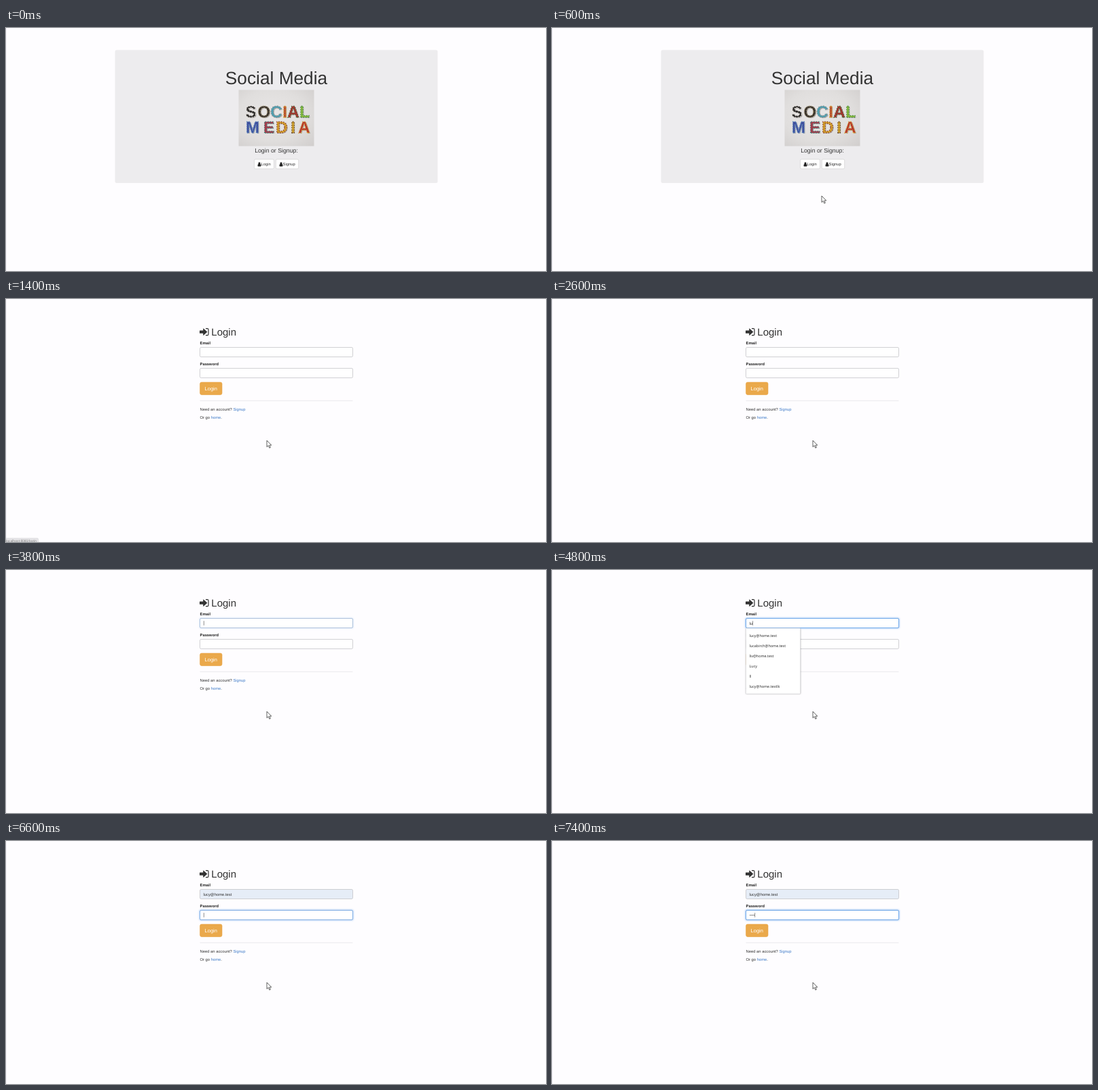
Animation of 795 by 359 pixels, one loop 8000 ms. Source, as an HTML page:

```html
<!DOCTYPE html>
<html lang="en">
<head>
<meta charset="utf-8">
<title>Login</title>
<style>
  html, body { margin: 0; width: 100%; height: 100%; overflow: hidden; background: #fefdff; }
  svg { display: block; width: 795px; height: 359px; }
  text { font-family: "Liberation Sans", Arial, sans-serif; font-size: 5.83px; fill: #333; text-rendering: geometricPrecision; white-space: pre; }
  .mid { text-anchor: middle; }
  .label { font-weight: bold; fill: #222; }
  .link { fill: #3f7bc8; }
  .ui { font-family: "Open Sans", "Noto Sans", sans-serif; font-size: 5.45px; fill: #222; }
  .field { fill: #fff; stroke: #c4c4c8; stroke-width: .8; }
  .glow { fill: none; stroke: #66a5ee; }
  .btn { fill: #fff; stroke: #ccc; stroke-width: .6; }
  .btn.down { fill: #e6e6e6; stroke: #999; stroke-width: 1; }
  .letter { font-weight: bold; font-size: 24px; text-anchor: middle; }
  .caret { fill: #444; }
</style>
</head>
<body>
<svg viewBox="0 0 795 359">
  <defs>
    <radialGradient id="wall" cx=".45" cy=".45" r=".75">
      <stop offset="0" stop-color="#e9e7e7"/>
      <stop offset=".6" stop-color="#e0dedd"/>
      <stop offset="1" stop-color="#d2cfce"/>
    </radialGradient>
    <filter id="soft" x="-20%" y="-20%" width="140%" height="140%"><feGaussianBlur stdDeviation="1"/></filter>
    <path id="user" d="M-2.5 3q-.2-3 1.2-3.1q1.3.9 2.6 0q1.4.1 1.2 3.1q-.2.4-.6.4h-3.8q-.4 0-.6-.4zM0-2.7a1.6 1.6 0 0 1 0 3.2a1.6 1.6 0 0 1 0-3.2z" fill="#222"/>
  </defs>
  <rect width="795" height="359" fill="#fefdff"/>
  <rect width="1" height="359" fill="#f5f3fb"/>

  <g id="home">
    <rect x="160.5" y="32.5" width="475" height="196.5" rx="2.5" fill="#edecee"/>
    <text class="mid" x="398" y="82.5" style="font-size:26.25px">Social Media</text>
    <rect x="342.5" y="91.5" width="111" height="83" fill="url(#wall)"/>
    <g id="letters"></g>
    <text class="mid" x="398" y="183.5" style="font-size:8.75px">Login or Signup:</text>
    <rect id="loginBtn" class="btn" x="365.5" y="194" width="29" height="14" rx="1.7"/>
    <rect class="btn" x="397.3" y="194" width="33.4" height="14" rx="1.7"/>
    <use href="#user" x="373" y="201"/>
    <use href="#user" x="405" y="201"/>
    <text x="375.5" y="203.2">Login</text>
    <text x="407.5" y="203.2">Signup</text>
  </g>

  <g id="form">
    <path d="M285.6 46.4h4.6v-2.4q0-.8.8-.3l5 4.5q.4.4 0 .8l-5 4.5q-.8.5-.8-.3v-2.4h-4.6q-.6 0-.6-.6v-3.2q0-.6.6-.6z" fill="#333"/>
    <path d="M294 43.6h2.4q1.6 0 1.6 1.6v6.8q0 1.6-1.6 1.6h-2.4" fill="none" stroke="#333" stroke-width="1.2"/>
    <text x="302.3" y="54" style="font-size:15px">Login</text>
    <text class="label" x="285.5" y="67.3">Email</text>
    <text class="label" x="285.5" y="98.2">Password</text>
    <g id="email"></g>
    <g id="password"></g>
    <rect x="285.6" y="123" width="32.4" height="18.4" rx="2.3" fill="#eaa94b" stroke="#e8a03c" stroke-width=".6"/>
    <text class="mid" x="301.8" y="134.6" style="font-size:7.5px;fill:#fff">Login</text>
    <path d="M285.5 150.3h225" stroke="#e6e5e9" stroke-width=".8"/>
    <text x="285.5" y="164.8">Need an account? <tspan class="link">Signup</tspan></text>
    <text x="285.5" y="177.3">Or go <tspan class="link">home</tspan>.</text>
    <g id="menu">
      <rect id="menuShade" x="285.5" y="87" width="80.5" fill="#000" opacity=".28" filter="url(#soft)"/>
      <rect id="menuBox" x="285.4" y="86" width="80.2" rx=".8" fill="#fff" stroke="#d2d2d6" stroke-width=".6"/>
      <rect id="pick" x="285.7" y="89.5" width="79.6" height="15" fill="#e2e2e2"/>
      <g id="items"></g>
    </g>
    <g id="status">
      <path d="M0 353.3h46q1.6 0 1.6 1.6v5h-48z" fill="#e6e5e8" stroke="#d5d4d8" stroke-width=".5"/>
      <text class="ui" x="0" y="358.6" style="font-size:4.8px;fill:#777">localhost:8080/login</text>
    </g>
  </g>

  <g id="cursor" stroke-linejoin="round">
    <path id="arrow" d="M0 0v9.5l2.2-2 1.6 3.6 1.6-.7-1.6-3.4h3z" fill="#fff" stroke="#222" stroke-width=".7"/>
    <g id="hand" fill="#fff" stroke="#222" stroke-width=".7">
      <path d="M-1.2.8q1.2-1.6 2.4 0v4q1.3-.9 2 .4q1.3-.7 1.9.5q1.4-.4 1.6 1v3q0 3-1.6 4.6h-5q-1.6-1.8-3.6-5.4q0-1.6 1.7-.8l.6.8z"/>
      <path d="M1.2 4.8v2.4M3.2 5.2v2.2M5.1 5.7v1.9" fill="none"/>
    </g>
  </g>
</svg>
<script>
const LOOP = 8000;
const $ = id => document.getElementById(id);

function add(parent, tag, attrs, text = '') {
  const el = document.createElementNS('http://www.w3.org/2000/svg', tag);
  for (const key in attrs) el.setAttribute(key, attrs[key]);
  el.textContent = text;
  return parent.appendChild(el);
}
const show = (el, on) => el.setAttribute('visibility', on ? 'visible' : 'hidden');

// Patterned letters on the wall: character, centre, base colour, pattern colour.
function letterRow(y, row) {
  for (const [char, x, base, accent] of row) {
    add($('letters'), 'text', { class: 'letter', x: x + 1.2, y: y + 1, style: 'fill:#8d8986', opacity: .5 }, char);
    add($('letters'), 'text', { class: 'letter', x, y, style: `fill:${base}` }, char);
    add($('letters'), 'text', {
      class: 'letter', x, y, style: 'fill:none', stroke: accent,
      'stroke-width': 1.3, 'stroke-dasharray': '1.5 2'
    }, char);
  }
}
letterRow(132, [
  ['S', 360.5, '#2f2d2c', '#d9d4cc'], ['O', 379.8, '#3a332c', '#a89c7c'], ['C', 398, '#4f9fb0', '#8b8f8e'],
  ['I', 410.5, '#b8502f', '#d9a83c'], ['A', 423, '#a5332f', '#4f6a3c'], ['L', 439.7, '#86b83e', '#4c8b4a']
]);
letterRow(155, [
  ['M', 363, '#3c4c9c', '#5a8cc0'], ['E', 387, '#a8394a', '#3f7d78'], ['D', 406, '#d3a02c', '#8c3c2a'],
  ['I', 422.5, '#d0a330', '#6b4a28'], ['A', 439, '#b5352c', '#d8a436']
]);

function makeField(group, y) {
  const box = { x: 285.5, y, width: 225, height: 14, rx: 1.7 };
  const halo = add(group, 'rect', { ...box, class: 'glow', 'stroke-width': 2.2, filter: 'url(#soft)' });
  const rect = add(group, 'rect', { ...box, class: 'field' });
  const ring = add(group, 'rect', { ...box, class: 'glow', 'stroke-width': .9 });
  const text = add(group, 'text', { x: 290.5, y: y + 9.1 });
  const dots = Array.from({ length: 4 }, (_, i) =>
    add(group, 'circle', { cx: 291.8 + i * 1.9, cy: y + 7.2, r: .65, fill: '#333' }));
  const caret = add(group, 'rect', { class: 'caret', y: y + 3.7, width: .6, height: 6.6 });
  return ({ value = '', count = 0, focus, caretOn, fill = '#fff', ui }) => {
    halo.setAttribute('opacity', focus * .6);
    ring.setAttribute('opacity', focus);
    rect.style.fill = fill;
    text.setAttribute('class', ui ? 'ui' : '');
    text.textContent = value;
    dots.forEach((dot, i) => show(dot, i < count));
    const end = value ? text.getComputedTextLength() : count * 1.9;
    caret.setAttribute('x', 290.9 + end);
    show(caret, caretOn);
  };
}
const drawEmail = makeField($('email'), 71.5);
const drawPassword = makeField($('password'), 102.4);

const MAIL = 'lucy@home.test';
const known = [MAIL, 'lucabirch@home.test', 'liv@home.test', 'Lucy', 'll', MAIL + 'lk'];
const rows = known.map((_, i) => add($('items'), 'text', { class: 'ui', x: 290.5, y: 99 + i * 15 }));

function drawMenu(query, picked) {
  show($('menu'), query);
  if (!query) {
    show($('pick'), false);
    rows.forEach(row => { row.textContent = ''; });
    return;
  }
  const list = known.filter(name => name.toLowerCase().startsWith(query));
  const height = list.length * 15 + 7;
  $('menuBox').setAttribute('height', height);
  $('menuShade').setAttribute('height', height - 1);
  show($('pick'), picked);
  rows.forEach((row, i) => { row.textContent = list[i] || ''; });
}

// Each step changes only the listed properties.
const steps = [
  [0, { page: 'home', at: null, hand: false, down: false, status: 0, value: '', fill: '#fff', ui: false,
        focus: 0, caret: false, query: '', picked: false, passFocus: 0, passCaret: false, count: 0 }],
  [400, { at: [412, 292] }],
  [600, { at: [397, 248] }],
  [800, { at: [385, 214] }],
  [1000, { at: [379, 197], hand: true, down: true }],
  [1200, { at: [378, 194.6] }],
  [1400, { page: 'form', at: [384, 209], hand: false, status: 1 }],
  [1800, { status: .8 }],
  [2000, { status: .55 }],
  [2200, { status: .3 }],
  [2400, { status: .12 }],
  [2600, { status: 0 }],
  [3800, { focus: .35, caret: true }],
  [4000, { focus: 1 }],
  [4400, { caret: false }],
  [4800, { value: 'lu', query: 'l', caret: true }],
  [5000, { value: 'luc', query: 'luc' }],
  [5200, { value: 'lucy', query: 'lucy' }],
  [5400, { caret: false }],
  [5800, { value: MAIL, ui: true, fill: '#e8effc', picked: true }],
  [6200, { query: '', picked: false, ui: false, fill: '#e6edf7', caret: true }],
  [6400, { focus: .5, caret: false, passFocus: .35, passCaret: true }],
  [6600, { focus: 0, passFocus: .8 }],
  [6800, { passFocus: 1 }],
  [7000, { count: 1 }],
  [7200, { count: 3 }],
  [7400, { count: 4 }]
];

function draw(t) {
  const s = Object.assign({}, ...steps.filter(([start]) => start <= t).map(step => step[1]));
  const home = s.page === 'home';
  $('home').style.display = home ? '' : 'none';
  $('form').style.display = home ? 'none' : '';
  $('loginBtn').classList.toggle('down', s.down);
  $('status').setAttribute('opacity', s.status);
  drawEmail({ value: s.value, focus: s.focus, caretOn: s.caret, fill: s.fill, ui: s.ui });
  drawPassword({ count: s.count, focus: s.passFocus, caretOn: s.passCaret });
  drawMenu(s.query, s.picked);
  $('cursor').style.display = s.at ? '' : 'none';
  if (s.at) $('cursor').setAttribute('transform', `translate(${s.at})`);
  show($('arrow'), !s.hand);
  show($('hand'), s.hand);
}

const origin = performance.now();
function tick() {
  draw((performance.now() - origin) % LOOP);
  requestAnimationFrame(tick);
}
tick();
</script>
</body>
</html>
```
